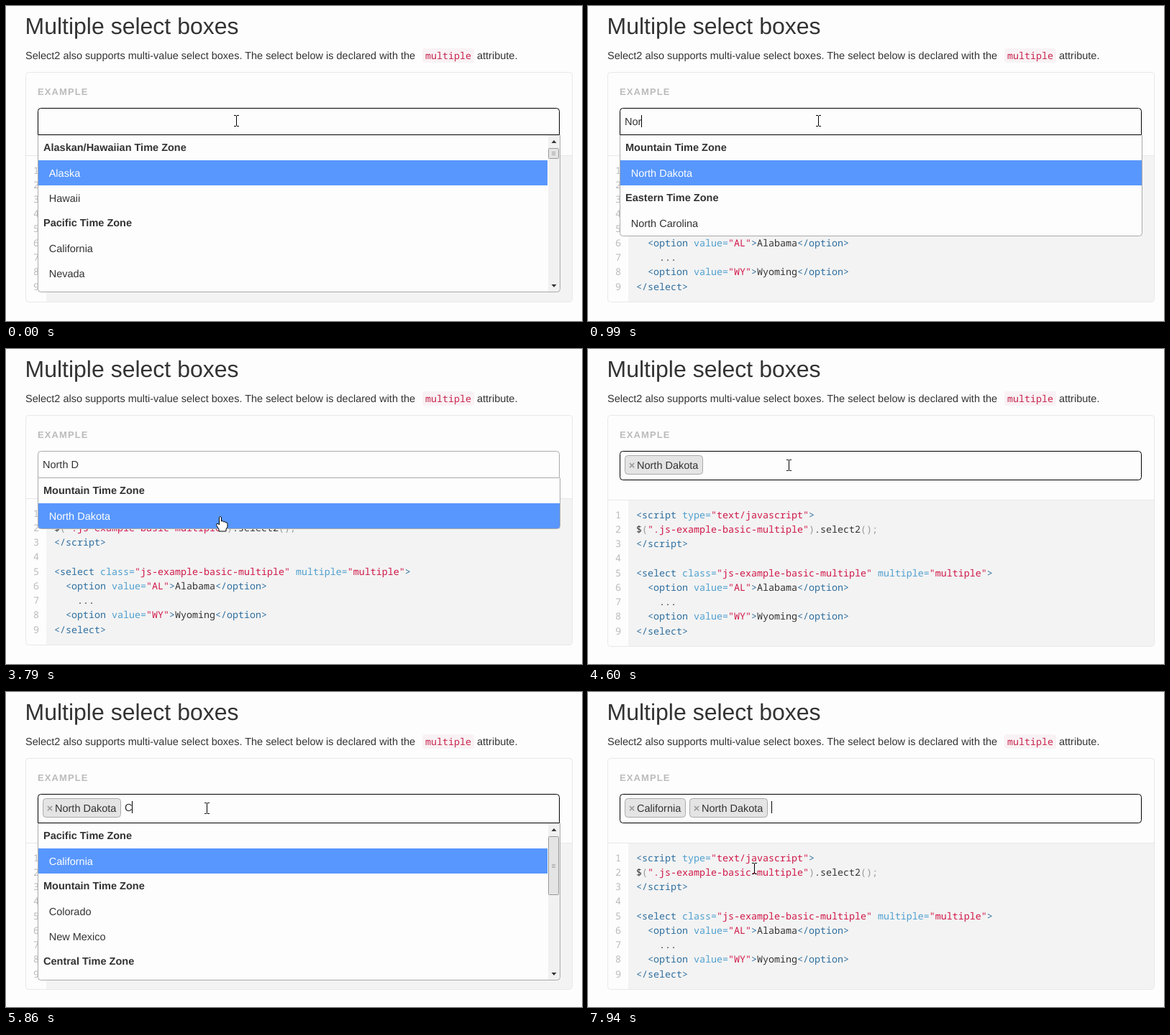
Animation of 801x439 px, one loop 8 s. Source, as an HTML page:

```html
<!DOCTYPE html>
<html lang="en">
<head>
<meta charset="utf-8">
<title>Multiple select boxes</title>
<style>
  html, body { margin: 0; width: 100%; height: 100%; overflow: hidden; background: #fdfdfd; }
  svg { display: block; }
  text { font: 14.5px "Liberation Sans", Arial, sans-serif; fill: #333; white-space: pre; text-rendering: geometricPrecision; }
  .title { font-size: 32px; }
  .label { font-size: 13px; font-weight: bold; letter-spacing: 1.1px; fill: #bbb; }
  .mono { font: 13.33px "Noto Sans Mono", monospace; }
  .inline { fill: #c7254e; }
  .number { fill: #bbb; }
  .t { fill: #2f6f9f; }
  .a { fill: #4f9fcf; }
  .s { fill: #d01848; }
  .g { fill: #999; }
  .group { font-weight: bold; }
  .active { fill: #fff; }
  .remove { font-weight: bold; fill: #999; }
</style>
</head>
<body>
<svg id="stage" width="801" height="439" viewBox="0 0 801 439"></svg>
<script>
const LOOP = 8000;
const stage = document.getElementById('stage');
const ruler = document.createElement('canvas').getContext('2d');
ruler.font = '14.5px "Liberation Sans", Arial, sans-serif';
const widthOf = s => ruler.measureText(s).width;

const escapeHtml = s => s.replace(/</g, '&lt;').replace(/>/g, '&gt;');
const text = (x, y, s, cls = '') => `<text x="${x}" y="${y}" class="${cls}">${s}</text>`;
const rect = (x, y, w, h, fill, extra = '') =>
  `<rect x="${x}" y="${y}" width="${w}" height="${h}" fill="${fill}" ${extra}/>`;
const path = (d, fill, stroke = 'none') => `<path d="${d}" fill="${fill}" stroke="${stroke}"/>`;

// Each part starts with its colour class: tag, attribute, string, grey, plain.
const code = [
  't<script|a type=|s"text/javascript"|t>',
  'p$|g(|s".js-example-basic-multiple"|g)|p.select2|g();',
  't<\/script>',
  '',
  't<select|a class=|s"js-example-basic-multiple"|a multiple=|s"multiple"|t>',
  'p  |t<option|a value=|s"AL"|t>|pAlabama|t</option>',
  'p    ...',
  'p  |t<option|a value=|s"WY"|t>|pWyoming|t</option>',
  't</select>'
];
const codeText = code.map((line, i) => {
  const y = 233.5 + 20.25 * i;
  const parts = line.split('|').map(p => `<tspan class="${p[0]}">${escapeHtml(p.slice(1))}</tspan>`);
  return text(38, y, i + 1, 'mono number') + (line && text(67, y, parts.join(''), 'mono'));
}).join('');

const header = text(26.5, 39, 'Multiple select boxes', 'title') +
  text(27, 74, 'Select2 also supports multi-value select boxes. The select below is declared with the') +
  rect(579, 59, 72, 20, '#f9f2f4', 'rx="4"') +
  text(583, 74, 'multiple', 'mono inline') + text(655, 74, 'attribute.');

// thumb: offset from the list top and height; only long lists have one.
const list = (rows, active = 1, thumb = null) => ({ rows: rows.split(','), active, thumb });
const PACIFIC = 'Pacific Time Zone', MOUNTAIN = 'Mountain Time Zone';
const CENTRAL = 'Central Time Zone', EASTERN = 'Eastern Time Zone', ALASKAN = 'Alaskan/Hawaiian Time Zone';
const lists = {
  all: list(`${ALASKAN},Alaska,Hawaii,${PACIFIC},California,Nevada`, 1, [18, 15]),
  n: list(`${ALASKAN},${PACIFIC},California,Nevada,Oregon,Washington`, 2, [18, 33]),
  nor: list(`${MOUNTAIN},North Dakota,${EASTERN},North Carolina`),
  northD: list(`${MOUNTAIN},North Dakota`),
  scrolled: list(`Nebraska,New Mexico,North Dakota,Utah,Wyoming,${CENTRAL}`, 2, [63, 15]),
  c: list(`${PACIFIC},California,${MOUNTAIN},Colorado,New Mexico,${CENTRAL}`, 1, [18, 82]),
  ca: list(`${PACIFIC},California,${EASTERN},North Carolina,South Carolina`),
  cal: list(`${PACIFIC},California`)
};

// Each step changes only what it names.
const steps = [
  [0, { typed: '', caret: false, open: 'all', tags: [], focus: true, cursor: ['beam', 320, 160] }],
  [130, { caret: true }],
  [690, { typed: 'N', open: 'n' }],
  [990, { typed: 'Nor', open: 'nor' }],
  [1120, { typed: 'Nort' }],
  [1260, { typed: 'North' }],
  [1730, { caret: false }],
  [1890, { typed: 'North ', caret: true }],
  [2160, { typed: 'North D', open: 'northD' }],
  [2700, { caret: false }],
  [3150, { caret: true }],
  [3280, { cursor: ['arrow', 312, 190] }],
  [3400, { cursor: ['arrow', 308, 203] }],
  [3540, { cursor: ['hand', 303, 219] }],
  [3670, { cursor: ['hand', 299, 229], caret: false }],
  [3790, { cursor: ['hand', 298, 233], focus: false }],
  [3930, { cursor: ['beam', 298, 233], focus: true, caret: true, typed: '', open: '', tags: ['North Dakota'] }],
  [4220, { cursor: ['arrow', 293, 191] }],
  [4340, { cursor: ['beam', 281, 174] }],
  [4460, { cursor: ['beam', 279, 168], caret: false }],
  [4600, { cursor: ['beam', 279, 162] }],
  [5030, { open: 'scrolled', caret: true }],
  [5590, { caret: false }],
  [5860, { typed: 'C', open: 'c', caret: true }],
  [6150, { typed: 'Ca', open: 'ca' }],
  [6460, { typed: 'Cal', open: 'cal' }],
  [6600, { typed: 'Cali' }],
  [7200, { caret: false }],
  [7350, { cursor: ['arrow', 273, 192] }],
  [7490, { cursor: ['arrow', 245, 212] }],
  [7650, { cursor: ['hand', 231, 246], caret: true }],
  [7940, { cursor: ['beam', 231, 246], typed: '', open: '', tags: ['California', 'North Dakota'] }]
];

const cursors = {
  beam: path('M-3-8h3v1h-3zM1-8h3v1h-3zM0-7h1v14h-1zM-3 7h3v1h-3zM1 7h3v1h-3z', '#000'),
  arrow: path('M.5.5V16.5L4.2 13 6.6 18.5 9 17.5 6.6 12H11.5Z', '#fff', '#000'),
  hand: path('M-1.5 12V1.5Q0-.5 1.5 1.5V7Q3.5 5.5 4.5 8 6.5 6.5 7.5 9 9.5 8 10 10.5V15L8 18V21H-2V18L-5.5 12.5Q-5.5 9.5-3 10.5Z', '#fff', '#000')
};

function drawPanel(shift) {
  return rect(27.5, 92.5, 760, 320 + shift, '#fdfdfd', 'stroke="#e8e8e8" rx="4"') +
    text(44, 124, 'EXAMPLE', 'label') +
    `<g transform="translate(0 ${shift})">` +
    path('M56 209H787V409Q787 412 784 412H56Z', '#f3f3f3') +
    rect(28, 208, 759, 1, '#e8e8e8') + codeText + '</g>';
}

function drawScrollbar(top, [offset, height]) {
  const y = top + offset;
  const grips = [-2, 0, 2].map(d => rect(759, y + (height >> 1) + d, 5, 1, '#aaa')).join('');
  return rect(754, top, 16, 218, '#f1f1f1') +
    path(`M758.5 ${top + 11}h7l-3.5-4z M758.5 ${top + 208}h7l-3.5 4z`, '#333') +
    rect(754.5, y + .5, 14, height - 1, '#e4e4e4', 'stroke="#999" rx="1"') + grips;
}

function drawDropdown({ rows, active, thumb }, top) {
  const bottom = top + (thumb ? 218 : rows.length * 35) + .5;
  const outline = `M44.5 ${top}V${bottom - 4}q0 4 4 4H766.5q4 0 4-4V${top}`;
  const items = rows.map((row, i) => {
    const y = top + 35 * i;
    if (row.endsWith('Zone')) return text(52, y + 22, row, 'group');
    const on = i === active;
    return (on ? rect(45, y, thumb ? 708 : 725, 35, '#5897fe') : '') +
      text(59.7, y + 23, row, on ? 'active' : '');
  }).join('');
  return path(outline, '#fdfdfd') + items + (thumb ? drawScrollbar(top, thumb) : '') +
    path(outline, 'none', '#aaa');
}

function drawSelect(s, bottom) {
  const corner = s.open ? 0 : 4;
  let out = path(`M44.5 ${bottom - corner}V146.5q0-4 4-4H765.5q4 0 4 4V${bottom - corner}` +
    `q0 ${corner} ${-corner} ${corner}H${44.5 + corner}q${-corner} 0 ${-corner} ${-corner}Z`,
    '#fdfdfd', s.focus ? '#000' : '#aaa');
  let x = 51;
  for (const tag of s.tags) {
    const w = Math.round(widthOf(tag) + 23.5);
    out += rect(x + .5, 148.5, w - 1, 26, '#e4e4e4', 'stroke="#aaa" rx="4"') +
      text(x + 5.8, 167, '×', 'remove') + text(x + 17, 167, tag);
    x += w + 5;
  }
  out += text(x, 166, s.typed);
  if (s.caret) out += rect(Math.round(x + widthOf(s.typed)), 152, 1, 17, '#000');
  return out;
}

function draw(s) {
  const tagged = s.tags.length > 0;
  const bottom = tagged ? 182.5 : 179.5;
  const [kind, x, y] = s.cursor;
  stage.innerHTML = header + drawPanel(tagged ? 2 : 0) +
    (s.open ? drawDropdown(lists[s.open], bottom + .5) : '') +
    drawSelect(s, bottom) +
    `<g transform="translate(${x} ${y})">${cursors[kind]}</g>`;
}

let shown = 0;
function tick() {
  const t = performance.now() % LOOP;
  const past = steps.filter(([at]) => at <= t);
  if (past.length !== shown) {
    shown = past.length;
    draw(Object.assign({}, ...past.map(([, change]) => change)));
  }
  requestAnimationFrame(tick);
}
tick();
</script>
</body>
</html>
```
